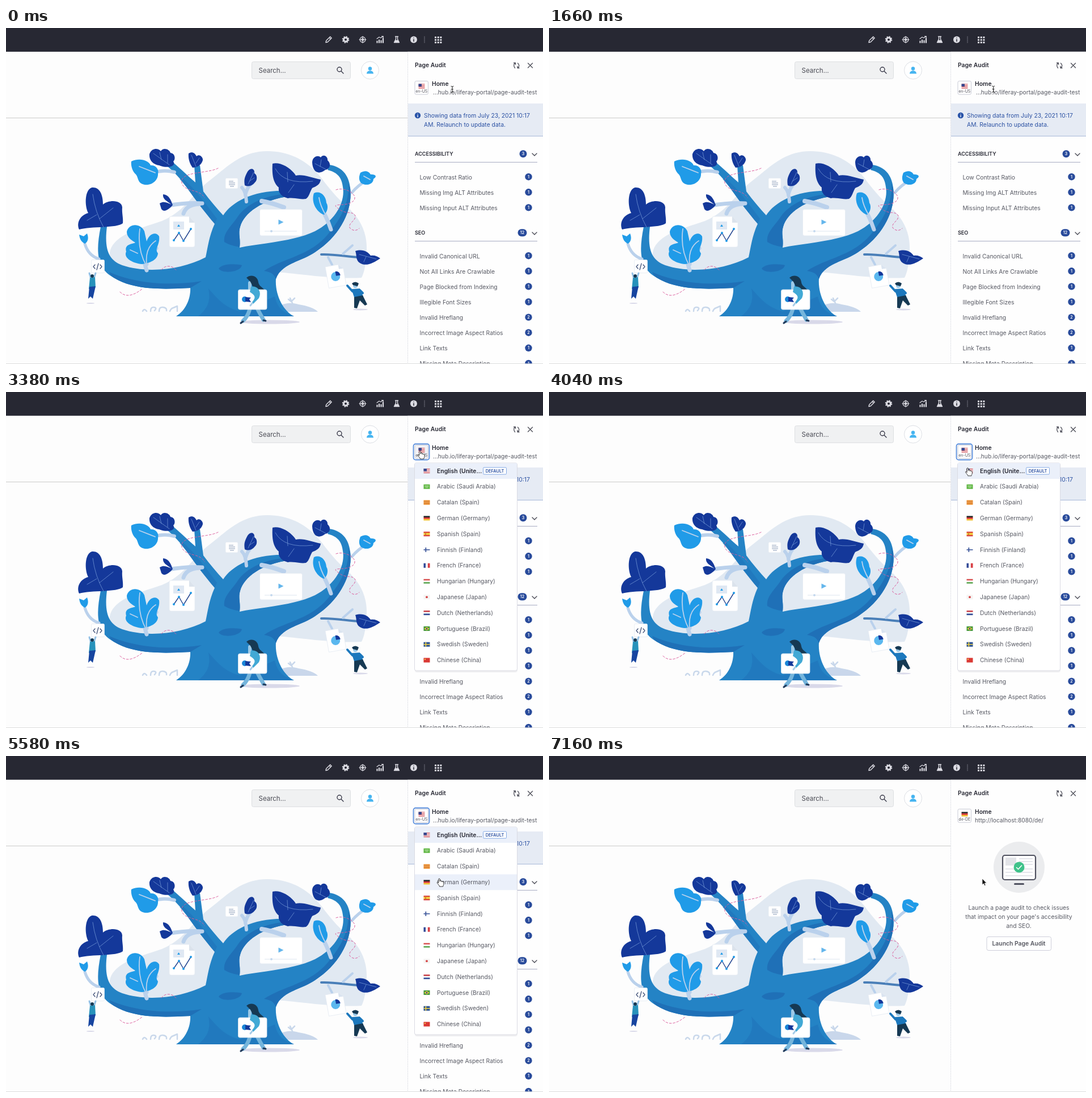
These frames come from a looping animation (947x592 px, 7.18 s). An HTML page:

```html
<!DOCTYPE html>
<html lang="en">
<head>
<meta charset="utf-8">
<title>Page Audit</title>
<style>
html,body{margin:0;width:100%;height:100%;overflow:hidden;background:#fdfdfd}
svg{display:block;position:absolute;left:0;top:0}
text{font:10.35px Inter,"Open Sans",sans-serif;fill:#575963;white-space:pre}
.b{font-size:10.38px;font-weight:600;fill:#272833}
.h{font-size:9px;font-weight:600;fill:#272833}
.n{font-size:7px;font-weight:600;fill:#fff;text-anchor:middle}
.s{font-size:7px;fill:#55565f;text-anchor:middle}
.i{fill:#2b51a3}
.m{text-anchor:middle}
.l{fill:none;stroke-linecap:round;stroke-linejoin:round}
.dark{fill:#14389a}.sky{fill:#209be8}.pale{stroke:#bad1ec}.vein{stroke:#6f93d4;stroke-width:.8}
.pink{stroke:#dc5d9c;stroke-width:1;stroke-dasharray:3.5 3}
.card{fill:#fff;stroke:#e4eaf2;stroke-width:.8}
</style>
</head>
<body>
<svg width="947" height="592" viewBox="0 0 947 592">
<rect width="947" height="592" fill="#fdfdfd"/>
<rect width="947" height="41.8" fill="#272833"/>

<g id="icons" class="l" stroke="#dcdce3" stroke-width="1.4">
  <path d="M564 25.500l.7-3.200 7-7 2.500 2.500-7 7zM570 17l2.500 2.500"/>
  <circle cx="599" cy="20.500" r="3.500" stroke-width="3"/>
  <circle cx="599" cy="20.500" r="5.400" stroke-width="1.800" stroke-dasharray="2.200 2.040" stroke-linecap="butt"/>
  <circle cx="629" cy="20.500" r="4.700"/><circle cx="629" cy="20.500" r="1.700"/>
  <path d="M629 14.500v12M623 20.500h12" stroke-width="1"/>
  <path d="M654.500 26.500v-4M658 26.500v-6M661.500 26.500v-5M665 26.500v-9" stroke-width="2.200" stroke-linecap="butt"/>
  <path d="M654 19l4-3 3 1.500 4-3M662.500 14.500h2.800v2.500" stroke-width="1.200"/>
  <path d="M686.500 15h5M687.500 15v4.500l-3 6h9l-3-6v-4.500"/><path d="M687 22h4l1.500 3h-7z" fill="#dcdce3"/>
  <circle cx="719" cy="20.500" r="6" fill="#dcdce3" stroke="none"/>
  <path d="M719 20v3.500M719 17.200v.1" stroke="#272833" stroke-width="1.500"/>
  <path d="M738 15v11" stroke="#72737e" stroke-width="1" stroke-dasharray="2 1"/>
</g>
<path d="M0 158.500H708" stroke="#cacbc9"/>
<rect x="433.500" y="59.500" width="174" height="30" rx="3" fill="#f0f1f2" stroke="#dddfe2"/>
<text x="445.500" y="79" style="font-size:11.5px;fill:#4b4c55">Search...</text>
<g class="l" stroke="#393a4a" stroke-width="1.400"><circle cx="588" cy="73" r="4"/><path d="M591 76l4 4"/></g>
<circle cx="642" cy="74.500" r="15.500" fill="#fff" stroke="#dcdfe4"/>
<g fill="#45b4f0"><circle cx="642" cy="71.500" r="3.200"/><path d="M636 80.500c0-7 12-7 12 0z"/></g>

<g id="tree">
  <path d="M183 396C188 364 238 353 275 340C315 324 330 290 360 268C390 245 415 217 461 217C505 217 535 238 556 264C575 290 590 305 605 318C628 340 637 365 636 390C635 415 632 430 627 440C580 443 520 433 476 430L330 445C260 455 180 440 183 396Z" fill="#e1e9f2"/>
  <path d="M475 500C480 485 500 482 516 487C530 489 545 494 550 500Z" fill="#c9d7eb"/>
  <path class="l" d="M241 499q3-6 7 0M255 499q0-8 6-7t1 6M270 499q0-8 7-7t6 6M289 499q2-5 6-6l7-3v9M506 487l-5-11M498 478l5 4 6-6" stroke="#c9d8eb" stroke-width="2.500"/>
  <path class="l" d="M556 399C580 398 600 403 624 404" stroke="#4a7fb8" stroke-width="4"/>
  <path class="l pale" d="M594 398l17-15M568 404l7 13" stroke-width="4"/>
  <path d="M352 404C310 426 250 433 205 418C181 409 173 390 178 350H167C158 395 160 424 190 440C225 461 270 461 325 458C326 475 318 497 300 508H508C489 499 474 470 476 442C485 415 520 412 545 395C590 366 612 320 607 282C604 256 590 244 570 241L567 250C584 254 592 263 594 280C599 307 580 340 545 358C505 377 450 379 412 387C414 370 409 363 413 350C420 326 450 303 502 296L498 287C440 284 399 305 383 330C372 318 360 304 348 288L342 242H332L334 272C320 260 308 248 296 238L284 243C297 254 307 265 318 280C335 304 350 324 368 345C358 367 356 386 352 404Z" fill="#2483c5"/>
  <g fill="#1f70b7">
    <path d="M413 350C420 326 450 303 502 296L498 292C455 294 424 311 409 332C397 350 383 360 385 377Q394 383 412 386C414 370 409 363 413 350Z"/>
    <path d="M190 440C225 461 270 461 325 458L345 446C285 455 228 450 182 430Q184 436 190 440Z"/>
    <path d="M607 282C612 320 590 366 545 395C520 412 485 415 476 442C472 432 466 430 455 428C490 404 540 402 572 358C598 326 605 300 604 274Z"/>
    <path d="M339 508C360 491 360 476 357 459C376 481 388 493 412 499L474 473C479 495 490 501 508 508Z" opacity=".5"/>
    <path d="M318 280C335 304 350 324 368 345L372 336C355 314 336 286 312 265L306 266Z" opacity=".5"/>
    <path d="M375 424C382 414 408 416 416 418C414 430 382 434 375 424Z"/>
  </g>
  <g class="l pale">
    <path d="M261 255Q278 249 297 254" stroke-width="6"/><path d="M285 313Q320 307 346 309M313 327Q318 311 342 310" stroke-width="7"/>
    <path d="M424 306Q423 288 416 281M422 294Q426 279 433 274" stroke-width="6"/>
    <path d="M451 305Q465 307 490 316" stroke-width="8"/>
    <path d="M554 315Q565 331 573 355" stroke-width="7"/>
    <path d="M635 269Q621 277 610 290" stroke-width="5"/>
    <path d="M139 380Q145 401 164 407" stroke-width="5"/>
    <path d="M239 365Q239 400 248 427M248 416Q246 401 265 388M237 397L220 388" stroke-width="7"/>
  </g>
  <g class="dark">
    <path d="M129 355C124 344 130 330 145 326C138 312 139 284 152 281C165 280 171 293 171 311C182 302 204 303 205 316C204 325 207 335 206 344C196 353 150 349 129 355Z"/>
    <path d="M253 222C257 211 268 211 273 217C277 210 288 213 290 220C299 221 299 232 295 235C301 244 284 248 270 242C258 240 252 232 253 222Z"/>
    <path d="M322 221C328 217 333 220 336 226C341 221 348 228 347 233C345 241 337 246 329 246C324 239 321 230 322 221Z"/>
    <path d="M426 253C432 245 439 248 438 256C444 259 443 269 439 272C434 279 425 280 421 277C419 266 422 261 426 253Z"/>
    <path d="M470 239C482 235 503 246 511 260C523 257 540 264 555 267C554 276 547 279 540 282C536 288 535 297 529 301C519 303 508 298 497 300C483 296 480 288 481 281C470 272 469 255 470 239Z"/>
    <path d="M540 237C540 227 550 223 555 228C560 221 568 227 567 233C575 240 570 249 563 250C552 259 541 255 540 237Z"/>
    <path d="M616 393C629 389 638 394 643 401C650 400 655 402 660 406C648 414 635 421 624 414C616 409 619 400 616 393Z"/>
    <path d="M271 309C280 304 285 309 292 311C282 304 276 301 277 293C288 294 291 304 294 312C288 319 279 326 274 319Z"/>
  </g>
  <g class="sky">
    <path d="M221 235C235 228 252 233 255 242C265 241 270 250 268 256C269 268 257 278 244 276C230 273 235 262 227 256C222 250 220 241 221 235Z"/>
    <path d="M213 359C216 344 237 343 244 358L248 376C252 362 265 358 270 367C272 382 261 389 268 397C267 409 254 414 240 416C221 414 207 404 212 394C208 380 224 381 228 378C219 373 213 367 213 359Z"/>
    <path d="M543 291C554 286 564 295 565 308C570 316 565 326 561 329C550 326 537 309 543 291Z"/>
    <path d="M625 255C635 249 641 254 643 258C655 258 653 263 648 266C648 276 634 279 626 273C621 267 623 260 625 255Z"/>
    <path d="M129 364L137 367 143 362C147 372 143 378 139 380C133 377 130 372 129 364Z"/>
  </g>
  <path class="l vein" d="M172 351Q157 324 153 293M165 336l24-19M160 329l-17 10M260 221l28 20M274 232l-3-13M285 238v-15M327 224l8 20M335 238l6-9M427 275l10-21M429 270l9-6M475 248Q490 276 541 270M497 271l-1-17M508 276l-10 14M545 239l19 10M554 244l2-12M623 399l30 8M635 403l-4 9"/>
  <path class="l pale" d="M235 244L263 255M248 420Q231 390 236 354M248 416Q245 387 264 375M232 397L219 391M552 299Q554 313 564 330M631 261L642 267" stroke-width="1.800"/>
  <g class="l pink">
    <path d="M374 247C355 257 306 252 310 273C315 290 342 283 350 299M582 285C600 279 625 296 611 306C597 316 570 307 586 318C600 330 611 321 616 331C617 340 601 345 607 353Q615 360 623 353M201 465C214 478 231 467 241 459M274 426C282 416 295 419 301 428"/>
  </g>

  <path class="card" d="M291 332H323L333 343V383Q333 386 330 386H291Q288 386 288 383V335Q288 332 291 332Z"/>
  <path d="M323 332l10 11h-10z" fill="#dbe3ec"/><path d="M295 341h19v14h-19z" fill="#dfe8f3"/><path d="M302 350l2.500-4 2.500 4z" fill="#209be8"/>
  <path class="l" d="M296 374l9-13 8 14 13-21" stroke="#274992" stroke-width="1.500"/>
  <g class="sky"><circle cx="296" cy="374" r="2"/><circle cx="305" cy="361" r="2"/><circle cx="313" cy="375" r="2"/><circle cx="326" cy="354" r="2"/></g>
  <rect class="card" x="447.500" y="319.500" width="75" height="46.500" rx="3"/>
  <path d="M480.500 337.500v9l9-4.500z" fill="#64b6ec"/><path d="M456 358h57" stroke="#dce5ef"/><circle cx="468" cy="358" r="2" fill="#c4d8ee"/>
  <rect class="card" x="387" y="264.500" width="22" height="18.500" rx="2"/>
  <path d="M393 270h8M393 273h11M393 276h11M395 279h7" stroke="#8799b5" stroke-width="1"/>
  <rect class="card" x="150.500" y="408.500" width="23" height="23" rx="2"/>
  <path class="l" d="M157 417l-3 3.500 3 3.500M166 417l3 3.500-3 3.500M163 415l-3 11" stroke="#405178" stroke-width="1.300"/>
  <g transform="rotate(-10 581 437)"><path class="card" d="M566 418h23l8 8v30h-31z"/><path d="M589 418v8h8z" fill="#dae4f0"/><circle cx="581" cy="438" r="8" fill="#5bb8ef"/><path d="M582 437v-8a8 8 0 0 1 8 8z" fill="#14389a"/></g>

  <g fill="#d9d9e9"><ellipse cx="465" cy="518" rx="53" ry="3.500"/><ellipse cx="625" cy="496" rx="13" ry="1.500"/><ellipse cx="149" cy="485" rx="7" ry="1"/></g>
  <g class="l">
    <path d="M431 490Q428 507 418 516M441 490Q447 502 454 514" stroke="#75b5dc" stroke-width="7"/>
    <path d="M418 517l-4 3M454 515l4 1" stroke="#203a5a" stroke-width="3"/>
    <path d="M430 449v18" stroke="#9cc9e6" stroke-width="6"/>
  </g>
  <path d="M424 440C432 433 444 437 445 448C447 459 460 457 456 470C450 462 443 462 438 461L431 447Z" fill="#163953"/>
  <rect class="card" x="409.500" y="461" width="50.500" height="35" rx="3"/>
  <circle cx="421" cy="478" r="5" fill="#1b86d7"/><path d="M422 474l10 1-3 3 3 5-10-1z" fill="#14389a"/>
  <path d="M432 456C443 453 452 464 446 476L436 486L434 483C443 473 437 470 430 465Z" fill="#42a9d5"/>
  <path class="l" d="M434 485l-3 4" stroke="#a8cde8" stroke-width="3"/>
  <path class="l" d="M147 432l4 14M158 432l-5 15" stroke="#94c1e6" stroke-width="3"/>
  <path d="M148 440L157 439 158 457 146 460Z" fill="#2792bb"/><path d="M147 456L158 455 153 477 149 473 145 477Z" fill="#1745a0"/>
  <circle cx="152" cy="437" r="3" fill="#163953"/>
  <circle cx="616" cy="454" r="4" fill="#9bc9e8"/><path d="M610 450Q616 445 622 450L620 455 612 453Z" fill="#163953"/>
  <path d="M609 460L624 459 630 473 615 477Z" fill="#1c78bd"/><path class="l" d="M611 464L602 454M624 462L629 467 620 468" stroke="#1c78bd" stroke-width="4"/>
  <path d="M614 474L629 471 637 487 633 489 624 480 619 494 614 493Z" fill="#163953"/>
</g>

<rect x="708" y="41.8" width="239" height="551" fill="#fefefe"/>
<path d="M708.500 42V592" stroke="#dedfe6" stroke-dasharray="2 1"/>
<text class="b" x="721" y="69.300">Page Audit</text>
<g class="l" stroke="#494a55" stroke-width="1.300"><path d="M897.500 70.500Q893.500 65 898 61.500M895.500 61.500h3v3M902.500 62Q907 66.500 902.500 70.500M905 70.500h-3v-3M920.500 62l8 8M928.500 62l-8 8"/></g>
<rect id="ring" x="718.500" y="91.500" width="28" height="28" rx="4" fill="#fff" stroke="#5b8fdd" stroke-width="1.800"/>
<rect id="button" x="721" y="93.500" width="23.500" height="23.500" rx="2.500" fill="#fff" stroke="#c9cbd6"/>
<g id="flag"></g>
<text class="s" id="locale" x="732.800" y="114.200"></text>
<text class="b" x="751" y="101.500">Home</text>
<text id="address" y="117.200" style="font-size:10.22px"></text>
<g id="list"></g>
<g id="done">
  <circle cx="829" cy="196" r="45" fill="#ebecee"/>
  <rect x="800" y="175" width="58" height="43" rx="4" fill="#fff" stroke="#505260" stroke-width="2.200"/>
  <path d="M805 179h19v14h-19z" fill="#e2e3e8"/>
  <path d="M829 181h24M829 186h24M829 191h24M805 199h48M805 205h48M805 211h48" stroke="#e5e6eb" stroke-width="2"/>
  <circle cx="829" cy="196" r="9.500" fill="#40c28a"/><path class="l" d="M824.500 196.500l3 3 6-6.500" stroke="#fff" stroke-width="1.600"/>
  <path class="l" d="M821.500 225.500h15" stroke="#505260" stroke-width="3"/>
  <text class="m" x="828.500" y="271.200">Launch a page audit to check issues</text>
  <text class="m" x="828.500" y="287.200">that impact on your page's accesibility</text>
  <text class="m" x="828.500" y="303.200">and SEO.</text>
  <rect x="772" y="318.500" width="113.500" height="24" rx="3" fill="#fff" stroke="#cdced9"/>
  <text class="b m" x="828.500" y="334.300" style="fill:#55565f">Launch Page Audit</text>
</g>
<g id="menu">
  <rect x="721" y="128" width="181" height="366" rx="4" fill="#30344a" opacity=".07"/>
  <rect x="720.500" y="125" width="181" height="366" rx="3" fill="#fff" stroke="#dadbe3"/>
  <path d="M721 125.500h180v27.500H721z" fill="#ebf0fa"/>
  <rect id="hover" x="721" width="180" height="27.800" fill="#ebf0fa"/>
  <g id="rows"></g>
  <rect x="841.500" y="133" width="41" height="12" rx="1.500" fill="#fff" stroke="#83a9e5"/>
  <text x="862" y="141.800" class="i m" style="font-size:7.4px;font-weight:600">DEFAULT</text>
</g>
<path d="M0 591.500H947" stroke="#dcdddd"/>
<g id="cursor">
  <path class="l" data-kind="text" d="M-2-5.500Q0-5.500 0-4Q0-5.500 2-5.500M0-4V4M-2 5.500Q0 5.500 0 4Q0 5.500 2 5.500M-1.500 0h3" stroke="#222" stroke-width="1"/>
  <path data-kind="hand" d="M-1.200 8V1.200C-1.200-.4 1.200-.4 1.200 1.200V5C2-.1 3.700 4 3.700 5.500C4.300 4.300 5.900 4.500 5.900 6C6.800 5.100 8 5.700 8 7V9.500C8 11.500 6.700 12 6.700 14H.5C.5 12-2 10.500-3.700 7.500C-4 6-2.400 5.900-1.200 8Z" fill="#fff" stroke="#222" stroke-width=".9"/>
  <path data-kind="arrow" d="M0 0V11L2.500 8.700L4.200 12.500L6 11.700L4.400 8H7.700Z" fill="#111" stroke="#fff" stroke-width=".7"/>
</g>
</svg>
<script>
const $ = id => document.getElementById(id);
const LOOP = 7180, OPEN = 3080, PICK = 5960;
const ROW = 27.79, TOP = 125.1;

let dots = '';
for (let i = 0; i < 9; i++)
  dots += `<rect x="${756 + i % 3 * 4.7}" y="${15 + (i / 3 | 0) * 4.5}" width="3" height="3" rx=".6" fill="#dcdce3" stroke="none"/>`;
$('icons').insertAdjacentHTML('beforeend', dots);

// flags: bands across or down, plus an optional emblem
const bands = (colors, down) => colors.split(' ').map((c, i, all) => {
  const w = 11 / all.length, h = 8 / all.length;
  return down ? `<rect x="${i * w}" width="${w + .05}" height="8" fill="${c}"/>`
              : `<rect y="${i * h}" width="11" height="${h + .05}" fill="${c}"/>`;
}).join('');
const mark = (d, color) => `<path d="${d}" fill="${color}"/>`;
const cross = color => mark('M3 0h1.700v3.200H11v1.600H4.700V8H3V4.800H0V3.200H3z', color);
const us = bands('#d0454d #fff #d0454d #fff #d0454d #fff #d0454d') + mark('M0 0h5.500v4.600H0z', '#34488f');
const german = bands('#292929 #d93030 #f1c232');
const languages = [
  ['English (Unite...', us],
  ['Arabic (Saudi Arabia)', bands('#62b846') + mark('M2 2.500h7v1H2zM3 5h5v.8H3z', '#d9f0cf')],
  ['Catalan (Spain)', bands('#ef922f #d97c2a #ef922f #d97c2a #ef922f')],
  ['German (Germany)', german],
  ['Spanish (Spain)', bands('#d5322f #f2c230 #f2c230 #d5322f') + mark('M2.500 3h2v2h-2z', '#b65b30')],
  ['Finnish (Finland)', bands('#fff') + cross('#344f96')],
  ['French (France)', bands('#334b98 #fff #d94045', true)],
  ['Hungarian (Hungary)', bands('#d95353 #fff #60a957')],
  ['Japanese (Japan)', bands('#f5f3f2') + '<circle cx="5.500" cy="4" r="1.900" fill="#d44142"/>'],
  ['Dutch (Netherlands)', bands('#c83e46 #fff #354f97')],
  ['Portuguese (Brazil)', bands('#46983d') + mark('M1 4l4.500-3L10 4 5.500 7z', '#f0cd37') + '<circle cx="5.500" cy="4" r="1.500" fill="#32478d"/>'],
  ['Swedish (Sweden)', bands('#2e5596') + cross('#eed044')],
  ['Chinese (China)', bands('#da3934') + mark('M1.500 1.500h2v2h-2z', '#efc84a')]
];
const flag = (x, y, art) => `<g transform="translate(${x} ${y})">${art}</g>`;
$('rows').innerHTML = languages.map(([name, art], i) => {
  const y = 139 + i * ROW;
  return flag(736.5, y - 4, art) + `<text x="760" y="${y + 3.7}"${i ? '' : ' class="b"'}>${name}</text>`;
}).join('');

const badge = (x, y, n, r = 6.2) => {
  const w = n > 9 ? 16 : r * 2;
  return `<rect x="${x - w / 2}" y="${y - r}" width="${w}" height="${r * 2}" rx="${r}" fill="#294b9b"/>` +
    `<text class="n" x="${x}" y="${y + 2.6}">${n}</text>`;
};
const section = (title, y, count, items) =>
  `<text class="h" x="721" y="${y + 3.3}">${title}</text>` + badge(count > 9 ? 910.5 : 912, y - .3, count, 6.5) +
  `<path class="l" d="M928 ${y - 1}l4 4 4-4" stroke="#454651" stroke-width="1.300"/>` +
  `<path d="M721 ${y + 14.5}H937" stroke="#a7abc2"/>` +
  items.map(([name, n], i) => {
    const cy = y + 41 + i * 27.1;
    return `<text x="729.500" y="${cy + 3.7}">${name}</text>` + badge(921.5, cy - .8, n);
  }).join('');
$('list').innerHTML =
  `<rect x="709" y="133" width="238" height="57" fill="#e6ebf4"/><path d="M709 190.500H947" stroke="#a6b8d9"/>
   <circle cx="726" cy="154" r="5.200" fill="#2853a8"/><path class="l" d="M726 153.700v3M726 151.300v.1" stroke="#fff" stroke-width="1.300"/>
   <text class="i" x="737" y="157.700">Showing data from July 23, 2021 10:17</text>
   <text class="i" x="737" y="173.700">AM. Relaunch to update data.</text>` +
  section('ACCESSIBILITY', 222, 3, [['Low Contrast Ratio', 1], ['Missing Img ALT Attributes', 1], ['Missing Input ALT Attributes', 1]]) +
  section('SEO', 361, 12, [['Invalid Canonical URL', 1], ['Not All Links Are Crawlable', 1], ['Page Blocked from Indexing', 1],
    ['Illegible Font Sizes', 1], ['Invalid Hreflang', 2], ['Incorrect Image Aspect Ratios', 2], ['Link Texts', 1], ['Missing Meta Description', 1]]);

// pointer moves: start, end, x, y
const moves = [[1560, 2240, 730, 104], [3780, 4460, 755, 194.5], [5200, 5560, 764, 216]];
const ease = p => p * p * (3 - 2 * p);
function pointer(t) {
  let x = 787, y = 108;
  for (const [from, to, tx, ty] of moves) {
    const p = ease(Math.min(1, Math.max(0, (t - from) / (to - from))));
    x += (tx - x) * p;
    y += (ty - y) * p;
  }
  return [x, y];
}
const show = (el, on) => { el.style.display = on ? '' : 'none'; };
const kinds = [...$('cursor').children];
let state;

function draw(t) {
  const [x, y] = pointer(t);
  const done = t >= PICK, open = t >= OPEN && !done;
  const onButton = x > 720 && x < 746 && y > 92 && y < 118;
  const row = Math.floor((y - TOP) / ROW);
  const kind = done ? 'arrow' : open || onButton ? 'hand' : x > 750 ? 'text' : 'arrow';
  if (state !== done) {
    state = done;
    $('flag').innerHTML = flag(727.5, 98.5, done ? german : us);
    $('locale').textContent = done ? 'de-DE' : 'en-US';
    $('address').textContent = done ? 'http://localhost:8080/de/' : '...hub.io/liferay-portal/page-audit-test';
    $('address').setAttribute('x', done ? 751 : 753);
  }
  show($('list'), !done);
  show($('done'), done);
  show($('menu'), open);
  show($('ring'), open);
  show($('hover'), row >= 0);
  $('hover').setAttribute('y', TOP + row * ROW);
  $('button').setAttribute('fill', onButton && !done ? '#f1f2f6' : '#fff');
  $('cursor').setAttribute('transform', `translate(${x} ${y})`);
  kinds.forEach(k => show(k, k.dataset.kind === kind));
}

const start = performance.now();
function tick() {
  draw((performance.now() - start) % LOOP);
  requestAnimationFrame(tick);
}
tick();
</script>
</body>
</html>
```
